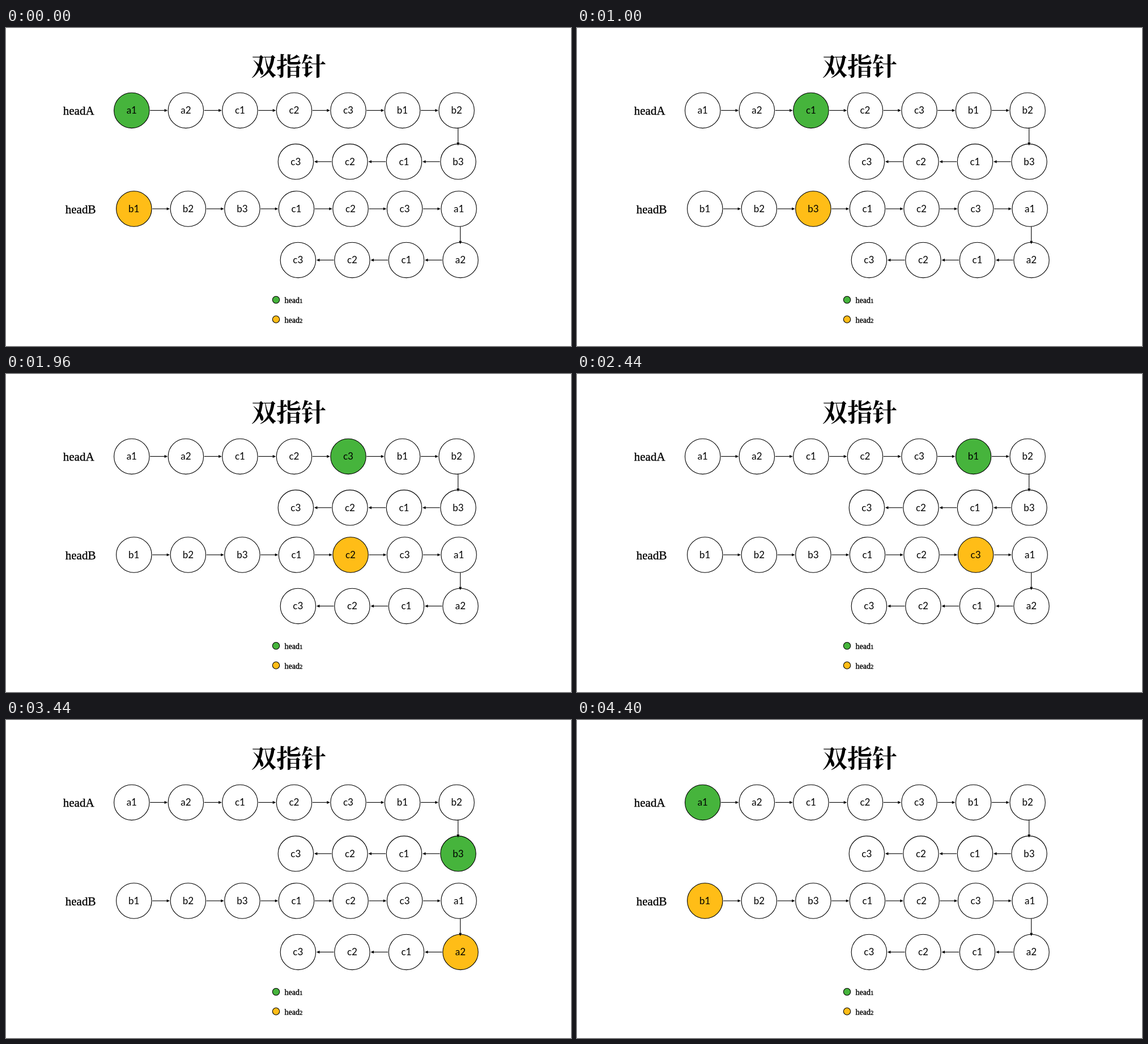
Recreate the animation shown at these times as an HTML page. Size 997 by 561 pixels, loop 4440 ms.

```html
<!DOCTYPE html>
<html lang="zh">
<head>
<meta charset="utf-8">
<title>双指针</title>
<style>
  html, body { margin: 0; width: 100%; height: 100%; overflow: hidden; background: #fff; }
  svg { display: block; width: 997px; height: 561px; }
  text { fill: #000; }
  circle { fill: #fff; stroke: #000; stroke-width: 1.1; }
  .link { stroke: #000; stroke-width: 1.1; }
  .title { font: 700 44px "Noto Serif CJK SC", "Noto Sans CJK SC", "Noto Sans CJK", serif; text-anchor: middle; }
  .node { font: 400 17px Lato, sans-serif; text-anchor: middle; }
  .label, .legend { font-family: "Liberation Serif", serif; stroke: #000; }
  .label { font-size: 21px; stroke-width: .35px; }
  .legend { font-size: 14px; stroke-width: .35px; }
  .legend tspan { font-size: 10.5px; }
</style>
</head>
<body>
<svg id="stage" viewBox="0 0 997 561">
  <text class="title" x="499" y="83.5">双指针</text>
</svg>
<script>
const GREEN = '#46b43c', ORANGE = '#ffbd17', RED = '#e32347', WHITE = '#fff';
const LOOP = 4440;
const TIMES = [0, 520, 1000, 1480, 1960, 2440, 2960, 3440, 3920, 4400];
const MEET = 8;          // index of the node where both pointers meet
const ROW = 7;           // nodes before the chain turns back
const GAP = 95.55, RADIUS = 31.2;

const stage = document.getElementById('stage');

function add(tag, attrs, text = '', parent = stage) {
  const el = document.createElementNS('http://www.w3.org/2000/svg', tag);
  for (const key in attrs) el.setAttribute(key, attrs[key]);
  el.textContent = text;
  parent.append(el);
  return el;
}

// Arrow of the given length, rotated around its starting point.
function addArrow(x, y, angle, length) {
  const g = add('g', { transform: `translate(${x} ${y}) rotate(${angle})` });
  add('line', { class: 'link', x2: length - 4 }, '', g);
  add('path', { d: `M${length} 0l-5.5 -2.6v5.2z` }, '', g);
}

function nodePosition(i, x, y) {
  return i < ROW
    ? [x + i * GAP, y]
    : [x + 2.9 + (2 * ROW - 1 - i) * GAP - GAP * 0, y + 90.4];
}

function animateFill(circle, index, color) {
  const frames = TIMES.map((time, step) => ({
    offset: time / LOOP,
    fill: step % (MEET + 1) === index ? color : WHITE,
    easing: 'steps(1, end)'
  }));
  frames.push({ offset: 1, fill: frames[frames.length - 1].fill });
  circle.animate(frames, { duration: LOOP, iterations: Infinity });
}

function addChain(name, names, x, y, color) {
  add('text', { class: 'label', x: x - 121, y: y + 8 }, name);
  const spots = names.map((_, i) => nodePosition(i < ROW ? i : i, x, y));
  // The second row starts below the last node of the first one.
  for (let i = ROW; i < names.length; i++) {
    spots[i][0] = x + 2.9 + (2 * ROW - 1 - i) * GAP;
  }
  names.forEach((text, i) => {
    const [cx, cy] = spots[i];
    const circle = add('circle', { cx, cy, r: RADIUS });
    add('text', { class: 'node', x: cx, y: cy + 5.8 }, text);
    if (i <= MEET) animateFill(circle, i, i === MEET ? RED : color);
  });
  spots.slice(0, -1).forEach(([cx, cy], i) => {
    if (i < ROW - 1) addArrow(cx + 32.5, cy, 0, 30.8);
    else if (i === ROW - 1) addArrow(cx + 2.6, cy + RADIUS, 90, 31);
    else addArrow(cx - 32.5, cy, 180, 30.5);
  });
}

function addLegend(y, digit, color) {
  add('circle', { cx: 476.5, cy: y, r: 6.2, style: `fill:${color}` });
  const text = add('text', { class: 'legend', x: 491.5, y: y + 5.5 }, 'head');
  add('tspan', {}, digit, text);
}

addChain('headA', 'a1 a2 c1 c2 c3 b1 b2 b3 c1 c2 c3'.split(' '), 221.8, 145.4, GREEN);
addChain('headB', 'b1 b2 b3 c1 c2 c3 a1 a2 c1 c2 c3'.split(' '), 225.8, 319, ORANGE);
addLegend(479.5, '1', GREEN);
addLegend(514, '2', ORANGE);
</script>
</body>
</html>
```
